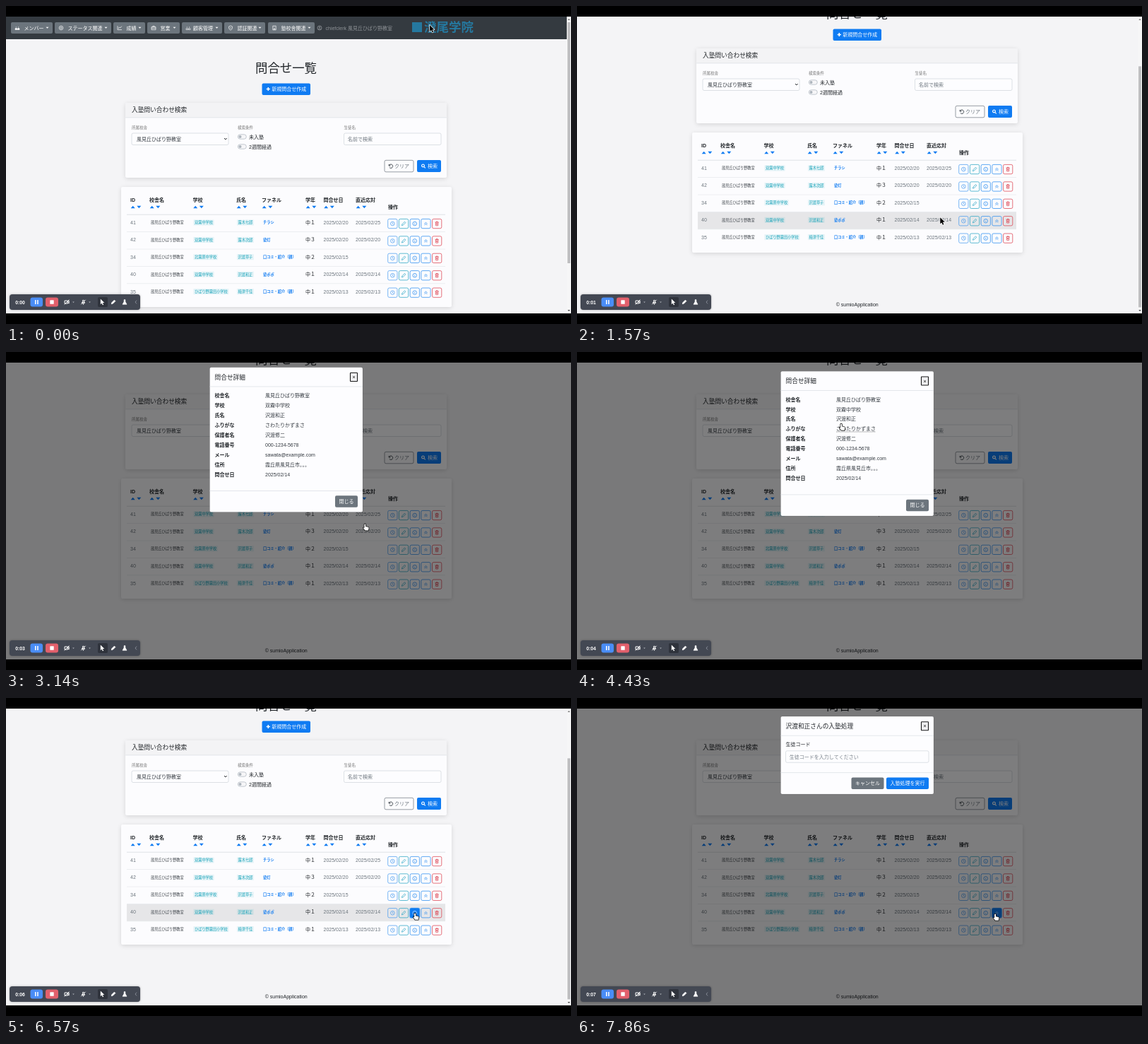
Animation of 800x450 px, one loop 8 s. Source, as an HTML page with a canvas:

```html
<!DOCTYPE html>
<html lang="ja">
<head>
<meta charset="utf-8">
<title>問合せ一覧</title>
<style>
html, body { margin: 0; width: 100%; height: 100%; overflow: hidden; background: #000; }
canvas { display: block; width: 800px; height: 450px; }
</style>
</head>
<body>
<canvas id="stage" width="800" height="450"></canvas>
<script>
const ctx = document.getElementById('stage').getContext('2d');
const LOOP = 8000, STEP = 1000 / 7, MAX_SCROLL = 77;
const FONT = '"Liberation Sans", "Noto Sans CJK JP", "Noto Sans CJK", sans-serif';
const BLUE = '#0f7bf2', TEAL = '#17a2b8', GRAY = '#6c757d', INK = '#212529', RED = '#dc3545', LINE = '#dee2e6';

const ROOM = '風見丘ひばり野教室';
const NAV = [
  ['メンバー', 7, 59, 'users'], ['ステータス関連', 69, 80, 'gear'], ['成績', 152, 45, 'chart'],
  ['営業', 200, 46, 'bag'], ['顧客管理', 249, 57, 'users'], ['認証関連', 309, 58, 'shield'], ['塾校舎関連', 371, 66, 'house']
];
const COLS = [['ID', 176], ['校舎名', 203], ['学校', 264.5], ['氏名', 326], ['ファネル', 362], ['学年', 424], ['問合せ日', 449.5], ['直近応対', 495]];
const ROWS = [
  ['41', '双霧中学校', '露木七郎', 'チラシ', '中１', '20', '25'],
  ['42', '双霧中学校', '露木次郎', '塾灯', '中３', '20', '20'],
  ['34', '北霧原中学校', '沢渡草子', '口コミ・紹介（親）', '中２', '15', ''],
  ['40', '双霧中学校', '沢渡和正', '塾ポポ', '中１', '14', '14'],
  ['35', 'ひばり野霧田小学校', '梅津千佳', '口コミ・紹介（親）', '中１', '13', '13']
];
const ACTIONS = [['clock', '#3f97f0'], ['pencil', '#1c9fc0'], ['info', '#1c86f0'], ['up', '#1c86f0'], ['trash', RED]];
const DETAILS = [
  ['校舎名', ROOM], ['学校', '双霧中学校'], ['氏名', '沢渡和正'], ['ふりがな', 'さわたりかずまさ'],
  ['保護者名', '沢渡修二'], ['電話番号', '000-1234-5678'], ['メール', 'sawata@example.com'],
  ['住所', '霞丘県風見丘市。。。'], ['問合せ日', '2025/02/14']
];
const ring = r => `M${-r} 0a${r} ${r} 0 1 0 ${2 * r} 0a${r} ${r} 0 1 0 ${-2 * r} 0`;
const ICONS = {
  users: 'M-3 2.4v-1a1.4 1.4 0 0 1 2.7 0v1zM.3 2.4v-1a1.4 1.4 0 0 1 2.7 0v1zM-2.2-1.2h1M1.1-1.2h1',
  gear: ring(2.8) + ring(1),
  chart: 'M-3-2.8v5.4h6M-2 1l1.6-2 1.2 1 2-2.4',
  bag: 'M-3-1.4h6v4h-6zM-1.2-1.4v-1.2h2.4v1.2M-3 .4h6',
  shield: 'M0-3l2.4 1v2q0 2-2.4 3.2q-2.4-1.2-2.4-3.2v-2zM0-1v2',
  house: 'M-2.2-2.8h4.4v5.6h-4.4zM-.8-1.4h.3M.6-1.4h.3M-.7 2.8v-2h1.4v2',
  person: ring(3) + 'M-1.8 2q1.8-2 3.6 0M-.8-.8a.8.8 0 1 0 1.6 0a.8.8 0 1 0-1.6 0',
  clock: ring(2.8) + 'M0-1.6v1.8l1.2.8',
  pencil: 'M-2.6 2.6l.6-2 3.4-3.4 1.4 1.4-3.4 3.4z',
  info: ring(2.8) + 'M0-.4v1.8M0-1.6v.4',
  up: 'M-2.2.2l2.2-1.8 2.2 1.8M-1.8 2l1.8-1.5 1.8 1.5',
  trash: 'M-2.4-2h4.8M-.8-2v-.8h1.6v.8M-1.8-2l.3 4.8h3l.3-4.8M-.5-.6v2M.5-.6v2',
  undo: 'M-2.6-2.6v2.2h2.2M-2.4-.6a2.7 2.7 0 1 1 .4 2.4',
  glass: 'M-2.4-.6a1.9 1.9 0 1 0 3.8 0a1.9 1.9 0 1 0-3.8 0M.9.9l1.9 1.9',
  plus: 'M-2.6 0h5.2M0-2.6v5.2',
  camOff: 'M-3-2h4.4v4h-4.4zM1.4-.4l1.8-1.4v3.6l-1.8-1.4M-3.4 3.4l6.8-6.8',
  micOff: 'M-1-2.6h2v3.6h-2zM-2.2 0q0 2.2 2.2 2.2t2.2-2.2M0 2.2v1.4M-3.2 3.2l6.4-6.4',
  marker: 'M-.8-3.4h1.6l.2 3 2 3.6h-6l2-3.6z',
  back: 'M1-2.4l-2 2.4 2 2.4',
  arrow: 'M0 0v9l2.1-1.9 1.5 3.3 1.5-.7-1.5-3.2h2.9z',
  hand: 'M-.8 0q.9-1 1.8 0v3.2l3.6.9q1 .4.8 1.5l-.6 3.2h-4.6l-2.6-3.6q.4-1 1.6-.2z'
};
for (const k in ICONS) ICONS[k] = new Path2D(ICONS[k]);

// time, x, y of the pointer tip
const PATH = [
  [0, 600, 27], [143, 600, 27], [900, 500, 298], [1290, 500, 298], [2290, 574, 305], [2900, 573, 305],
  [3430, 425, 165], [4000, 400, 72], [4430, 374, 102], [4720, 374, 102], [5500, 492, 38],
  [5860, 492, 38], [6570, 579, 305], [6900, 579, 305], [7143, 592, 306], [8000, 592, 306]
];

const ramp = (t, start, len) => Math.min(1, Math.max(0, (t - start) / len));
const smooth = k => k * k * (3 - 2 * k);
const easeOut = k => 1 - Math.pow(1 - k, 1.8);

function pointerAt(t) {
  const i = Math.max(1, PATH.findIndex(p => p[0] > t));
  const [t0, x0, y0] = PATH[i - 1], [t1, x1, y1] = PATH[i];
  const k = smooth(ramp(t, t0, t1 - t0));
  return { x: x0 + (x1 - x0) * k, y: y0 + (y1 - y0) * k };
}

// Text is placed by its vertical centre.
function text(s, x, cy, color = INK, size = 7, weight = 400, align = 'left') {
  ctx.font = `${weight} ${size}px ${FONT}`;
  ctx.textAlign = align;
  ctx.fillStyle = color;
  ctx.fillText(s, x, cy + size * 0.37);
}
function box(x, y, w, h, fill, stroke, r = 2, lw = 0.7) {
  ctx.beginPath();
  ctx.roundRect(x, y, w, h, r);
  if (fill) { ctx.fillStyle = fill; ctx.fill(); }
  if (stroke) { ctx.strokeStyle = stroke; ctx.lineWidth = lw; ctx.stroke(); }
}
function rule(x, y, w, color = LINE, h = 0.8) {
  ctx.fillStyle = color;
  ctx.fillRect(x, y, w, h);
}
function tri(x, y, half, h, color) {
  ctx.fillStyle = color;
  ctx.beginPath();
  ctx.moveTo(x - half, y - h / 2);
  ctx.lineTo(x + half, y - h / 2);
  ctx.lineTo(x, y + h / 2);
  ctx.fill();
}
function icon(name, x, y, stroke, lw = 0.8, fill) {
  ctx.save();
  ctx.translate(x, y);
  ctx.lineJoin = 'round';
  ctx.lineWidth = lw;
  if (stroke) { ctx.strokeStyle = stroke; ctx.stroke(ICONS[name]); }
  if (fill) { ctx.fillStyle = fill; ctx.fill(ICONS[name]); }
  ctx.restore();
}
function card(x, y, w, h) {
  ctx.save();
  ctx.shadowColor = 'rgba(0,0,0,.13)';
  ctx.shadowBlur = 6;
  ctx.shadowOffsetY = 1.5;
  box(x, y, w, h, '#fcfcfe');
  ctx.restore();
}

function navbar() {
  rule(0, 15, 794, '#343a40', 32);
  for (const [label, x, w, name] of NAV) {
    box(x, 23, w, 16, GRAY);
    icon(name, x + 9, 31, '#fff', 0.7, name === 'users' && x < 10 ? '#fff' : null);
    text(label, x + (label === '顧客管理' ? 16 : 18.5), 31, '#fff');
    tri(x + w - 7.5, 30.7, 2, 2, '#fff');
  }
  icon('person', 444, 31, '#a0a4a8', 0.7);
  text('chiefclerk ' + ROOM, 452.5, 31, '#8e9296');
  box(575, 23, 14, 14, '#25789f', null, 0);
  text('澄尾学院', 592, 30, '#25789f', 17.5, 700);
}

function searchCard() {
  card(169, 137, 455, 106);
  box(169, 137, 455, 21, '#f3f3f5');
  rule(169, 157.5, 455);
  text('入塾問い合わせ検索', 178, 147, INK, 8.7);
  text('所属校舎', 178, 172.3, '#777', 5.5);
  text('検索条件', 328, 172.3, '#777', 5.5);
  text('生徒名', 478.5, 172.3, '#777', 5.5);
  box(178, 180, 137, 16.5, '#fdfdff', '#ced4da');
  text(ROOM, 185, 188, '#343a40');
  ctx.strokeStyle = INK;
  ctx.lineWidth = 1;
  ctx.beginPath();
  ctx.moveTo(309, 187); ctx.lineTo(310.8, 189); ctx.lineTo(312.6, 187);
  ctx.stroke();
  ['未入塾', '2週間経過'].forEach((s, i) => {
    const y = 185 + i * 14;
    box(328.3, y - 3.2, 12, 6.4, '#f6f6f8', '#adb5bd', 3.2);
    box(329.5, y - 2, 4, 4, '#adb5bd', null, 2);
    text(s, 344, y);
  });
  box(478.5, 180, 137.5, 16.5, '#fdfdff', '#ced4da');
  text('名前で検索', 484, 188, GRAY);
  box(536, 218.3, 41, 16.5, null, GRAY);
  icon('undo', 544.8, 226.5, '#444b51', 1);
  text('クリア', 550, 226.5, GRAY);
  box(582, 218, 34, 17, BLUE);
  icon('glass', 591, 226.5, '#fff', 1.1);
  text('検索', 597, 226.5, '#fff');
}

function badge(s, x, y, color, tint) {
  if (tint) rule(x - 1.5, y - 4, s.length * 5.2 + 3, tint, 8);
  text(s, x, y, color, 5.2, 500);
}

function table(ptr, scroll, dimmed) {
  card(163, 256, 468, 170);
  for (const [label, x] of COLS) {
    text(label, x, 274, INK, 7, 700);
    tri(x + 3.7, 284.5, 3, -3.4, BLUE);
    tri(x + 12.3, 284.5, 3, 3.4, BLUE);
  }
  text('操作', 541, 284.5, INK, 7, 700);
  rule(171, 294.7, 451, LINE, 1);
  ROWS.forEach(([id, school, name, funnel, grade, asked, met], i) => {
    const top = 295.3 + 24.4 * i, y = top + 11.2, mid = y + 1.5, py = ptr.y + scroll;
    const over = ptr.x > 171 && ptr.x < 622 && py > top && py < top + 24.4;
    if (over && !dimmed) rule(171, top, 451, 'rgba(0,0,0,.085)', 24.4);
    if (i) rule(171, top - 0.4, 451, '#e6e9ec', 0.7);
    text(id, 176, y, GRAY);
    badge(ROOM, 205, y, '#3c4248');
    badge(school, 267, y, TEAL, 'rgba(23,162,184,.1)');
    badge(name, 328.5, y, TEAL, 'rgba(23,162,184,.1)');
    text(funnel, 364, y, BLUE, 5.2, 700);
    text(grade, 424, y, INK, 7, 500);
    text('2025/02/' + asked, 449.5, y, GRAY);
    if (met) text('2025/02/' + met, 495, y, GRAY);
    ACTIONS.forEach(([glyph, color], j) => {
      const x = 540.7 + 15.7 * j;
      const hot = over && ptr.x > x && ptr.x < x + 13.3 && Math.abs(py - mid) < 7;
      if (hot) box(x - 0.8, mid - 7.4, 14.9, 14.9, 'rgba(0,123,255,.45)');
      box(x, mid - 6.6, 13.3, 13.3, hot ? BLUE : null, color);
      icon(glyph, x + 6.65, mid, hot ? '#cfe5ff' : color, 0.7);
    });
  });
}

function scrollbar(scroll) {
  rule(794, 15, 6, '#f6f6f7', 420);
  rule(795, 23 + scroll * 0.81, 4, '#bfbfc1', 341);
  tri(797, 19, 1.8, -2.2, '#777');
  tri(797, 431, 1.8, 2.2, '#444');
}

function page(ptr, scroll, dimmed) {
  rule(0, 15, 800, '#f4f4f6', 420);
  ctx.save();
  ctx.translate(0, -scroll);
  navbar();
  text('問合せ一覧', 396.5, 88, INK, 17.4, 500, 'center');
  box(362.5, 109.5, 68.5, 16.5, BLUE);
  icon('plus', 371.3, 117.5, '#fff', 1.5);
  text('新規問合せ作成', 376.3, 117.8, '#fff');
  searchCard();
  table(ptr, scroll, dimmed);
  text('© sumioApplication', 396.7, 499.5, INK, 7, 400, 'center');
  ctx.restore();
  if (!dimmed) scrollbar(scroll);
}

function dialog(title, h, shown, draw) {
  if (!shown.alpha) return;
  ctx.save();
  ctx.globalAlpha = shown.alpha;
  ctx.translate(0, -22 * (1 - shown.slide));
  box(288.5, 27.3, 216.5, h, '#fdfdff', 'rgba(0,0,0,.2)', 2, 0.5);
  text(title, 295.5, 41, INK, 8.7);
  box(487.5, 35, 10, 12, '#f0f0f2', '#1a1a1a', 0.5, 1.1);
  text('×', 492.5, 41, '#000', 7, 400, 'center');
  rule(288.5, 54, 216.5);
  draw();
  ctx.restore();
}

function detail(ptr) {
  DETAILS.forEach(([label, value], i) => {
    const y = 67 + 13.95 * i;
    text(label, 295.5, y, INK, 7, 700);
    text(value, 367, y, '#343a40');
  });
  if (ptr.x > 367 && ptr.x < 423 && ptr.y > 100 && ptr.y < 114) {
    for (let x = 367; x < 423; x += 2) rule(x, 112.6, 1.2, '#777', 0.8);
  }
  rule(288.5, 201.5, 216.5);
  box(466, 208.7, 32, 16.5, GRAY);
  text('閉じる', 482, 216.8, '#fff', 7, 400, 'center');
}

function enroll() {
  text('生徒コード', 295.5, 67, INK, 7, 500);
  box(295.5, 76, 202.5, 16.5, '#fdfdff', '#ced4da');
  text('生徒コードを入力してください', 300.7, 84.2, '#7a828a');
  rule(288.5, 106.5, 216.5);
  box(388.5, 113.7, 46, 16.5, GRAY);
  text('キャンセル', 411.5, 122, '#fff', 7, 400, 'center');
  box(438, 113.7, 60, 16.5, BLUE);
  text('入塾処理を実行', 468, 122, '#fff', 7, 400, 'center');
}

function toolbar(t) {
  ctx.save();
  ctx.shadowColor = 'rgba(0,0,0,.3)';
  ctx.shadowBlur = 3;
  box(5, 408, 185, 22, '#434853', null, 4);
  ctx.restore();
  text('0:0' + Math.floor(t / 1000 + 0.001), 13.3, 419, '#fff', 6.8, 700);
  box(34.5, 412.5, 17.5, 13, '#4a8df6', null, 3);
  rule(41, 416, 1.5, '#fff', 6);
  rule(44.2, 416, 1.5, '#fff', 6);
  box(56, 412.5, 18, 13, '#e2606c', null, 3);
  box(62.3, 416.3, 5.4, 5.4, '#fff', null, 0.5);
  icon('camOff', 86, 419, '#fff', 1);
  icon('micOff', 109.5, 419, '#fff', 0.9);
  tri(95.5, 419.3, 1.3, 1.4, '#b8bbc2');
  tri(118.5, 419.3, 1.3, 1.4, '#b8bbc2');
  box(130, 412, 14, 14, '#2f333c', null, 2);
  ctx.save();
  ctx.translate(133.8, 414.5);
  ctx.scale(0.85, 0.85);
  icon('arrow', 0, 0, null, 1, '#fff');
  ctx.restore();
  icon('pencil', 152, 419, '#fff', 1, '#fff');
  icon('marker', 168, 419, '#fff', 0.6, '#fff');
  icon('back', 184, 419, '#8d919b', 0.9);
}

function pointer(ptr, hand) {
  if (hand) icon('hand', ptr.x, ptr.y, '#000', 1.4, '#fff');
  else icon('arrow', ptr.x, ptr.y, '#fff', 1.4, '#000');
}

function draw(t) {
  const ptr = pointerAt(t);
  const scroll = MAX_SCROLL * smooth(ramp(t, 286, 714));
  const dim = ramp(t, 2791, 150) - ramp(t, 5791, 150) + ramp(t, 7425, 150);
  const first = {
    alpha: ramp(t, 2981, 150) - ramp(t, 5624, 150),
    slide: easeOut(ramp(t, 2981, 300)) - easeOut(ramp(t, 5624, 300))
  };
  const second = { alpha: ramp(t, 7617, 150), slide: easeOut(ramp(t, 7617, 300)) };

  ctx.fillStyle = '#000';
  ctx.fillRect(0, 0, 800, 450);
  ctx.save();
  ctx.beginPath();
  ctx.rect(0, 15, 800, 420);
  ctx.clip();
  page(ptr, scroll, dim > 0);
  if (dim > 0) rule(0, 15, 800, `rgba(0,0,0,${dim / 2})`, 420);
  dialog('問合せ詳細', 204.7, first, () => detail(ptr));
  dialog('沢渡和正さんの入塾処理', 110, second, enroll);
  toolbar(t);
  const onAction = ptr.x > 540 && ptr.y > 297 && ptr.y < 312;
  pointer(ptr, onAction || first.alpha > 0);
  ctx.restore();
}

const begin = performance.now();
function tick() {
  const t = (performance.now() - begin) % LOOP;
  draw(Math.floor((t + 3) / STEP) * STEP % LOOP);
  requestAnimationFrame(tick);
}
tick();
</script>
</body>
</html>
```
